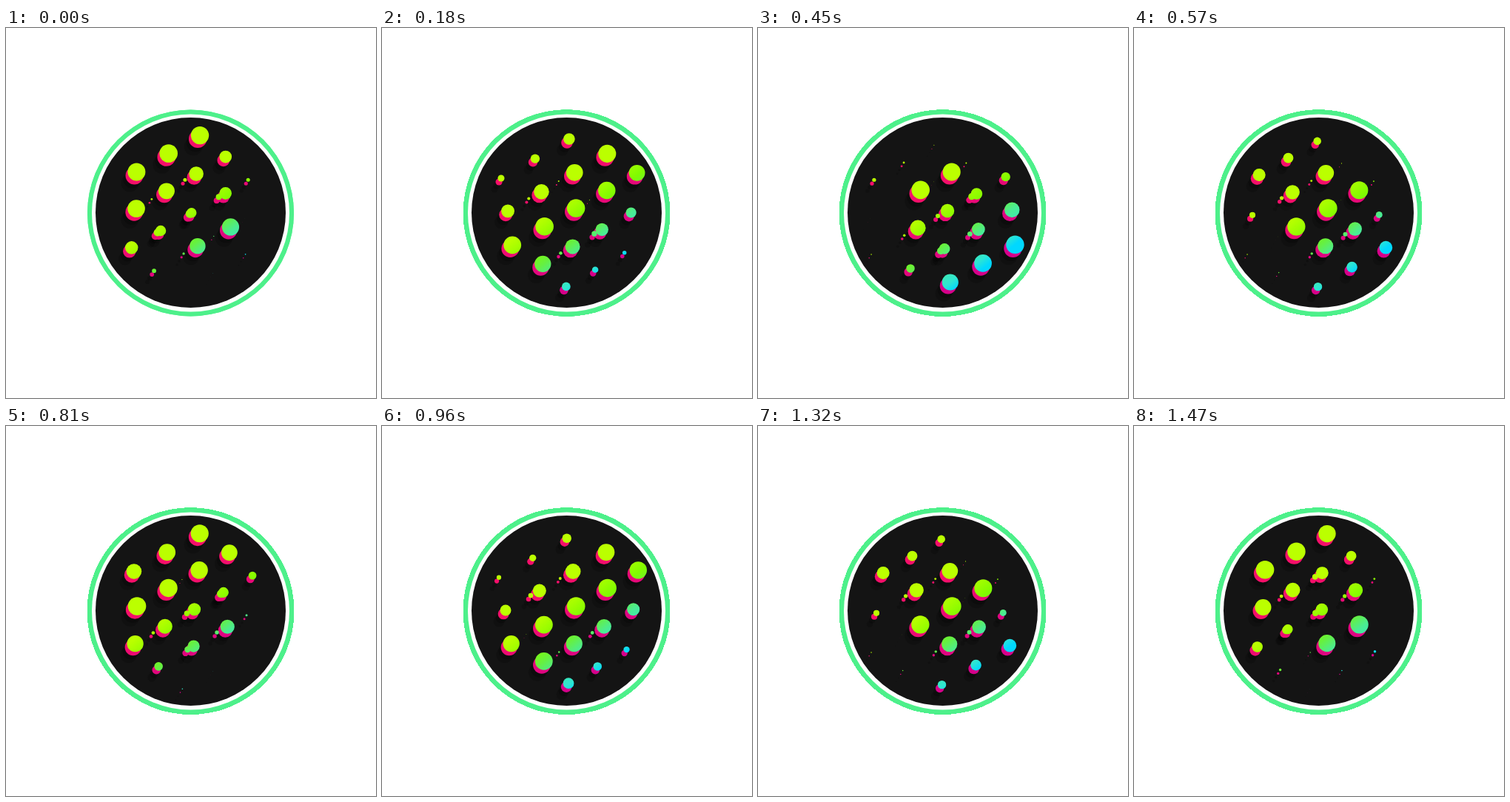
An HTML page with a canvas that plays this animation: 500x500 px, repeating every 1500 ms.

```html
<!DOCTYPE html>
<html lang="en">
<head>
<meta charset="utf-8">
<title>Pulsing dots</title>
<style>
  html, body { margin: 0; height: 100%; overflow: hidden; background: #fff; }
  canvas { display: block; }
</style>
</head>
<body>
<canvas id="stage" width="500" height="500"></canvas>
<script>
const ctx = document.getElementById('stage').getContext('2d');
const PERIOD = 750;          // ms per pulse, two pulses per loop
const COL = 42.6, ROW = 49.3; // hexagonal lattice spacing
const MAX_R = 12.3;

function gradient(stops) {
  const g = ctx.createLinearGradient(180, 240, 270, 360);
  for (const [at, color] of stops) g.addColorStop(at, color);
  return g;
}

const lime = gradient([
  [.23, '#bbff00'], [.44, '#80fb00'], [.57, '#66f040'],
  [.68, '#4aeb94'], [.87, '#30e6d0'], [.95, '#00d8ff']
]);
const pink = gradient([[.1, '#f50f6a'], [.9, '#d6008a']]);

// Layers from back to front: x offset, y offset, fill
const layers = [
  [-9, 15, 'rgba(0,0,0,.2)'],
  [-6, 10, 'rgba(0,0,0,.25)'],
  [-2.9, 4.9, pink],
  [0, 0, lime]
];

// Columns of 3-4-5-4-3 dots; the inner seven hold a second dot in antiphase
const dots = [];
for (let col = -2; col <= 2; col++) {
  const half = 2 - Math.abs(col) / 2;
  for (let row = -half; row <= half; row++) {
    const dx = col * COL, dy = row * ROW;
    const peak = 200 + 1.77 * (dx + dy);
    const add = time => dots.push({ x: 236.7 + dx, y: 257.5 + dy, peak: time });
    add(peak);
    if (Math.hypot(dx, dy) < 60) add(peak + PERIOD / 2);
  }
}

function disc(x, y, r, fill) {
  ctx.beginPath();
  ctx.arc(x, y, r, 0, 2 * Math.PI);
  ctx.fillStyle = fill;
  ctx.fill();
}

function draw() {
  const t = performance.now() % (2 * PERIOD);
  disc(249.5, 250, 139.5, '#4df08a');
  disc(249.5, 250, 133.5, '#fff');
  disc(249.5, 249.5, 128.5, '#141414');
  for (const [ox, oy, fill] of layers) {
    for (const { x, y, peak } of dots) {
      const s = (1 + Math.cos(2 * Math.PI * (t - peak) / PERIOD)) / 2;
      disc(x + 25.6 * s + ox, y - 14 * s + oy, MAX_R * s, fill);
    }
  }
  requestAnimationFrame(draw);
}
draw();
</script>
</body>
</html>
```
